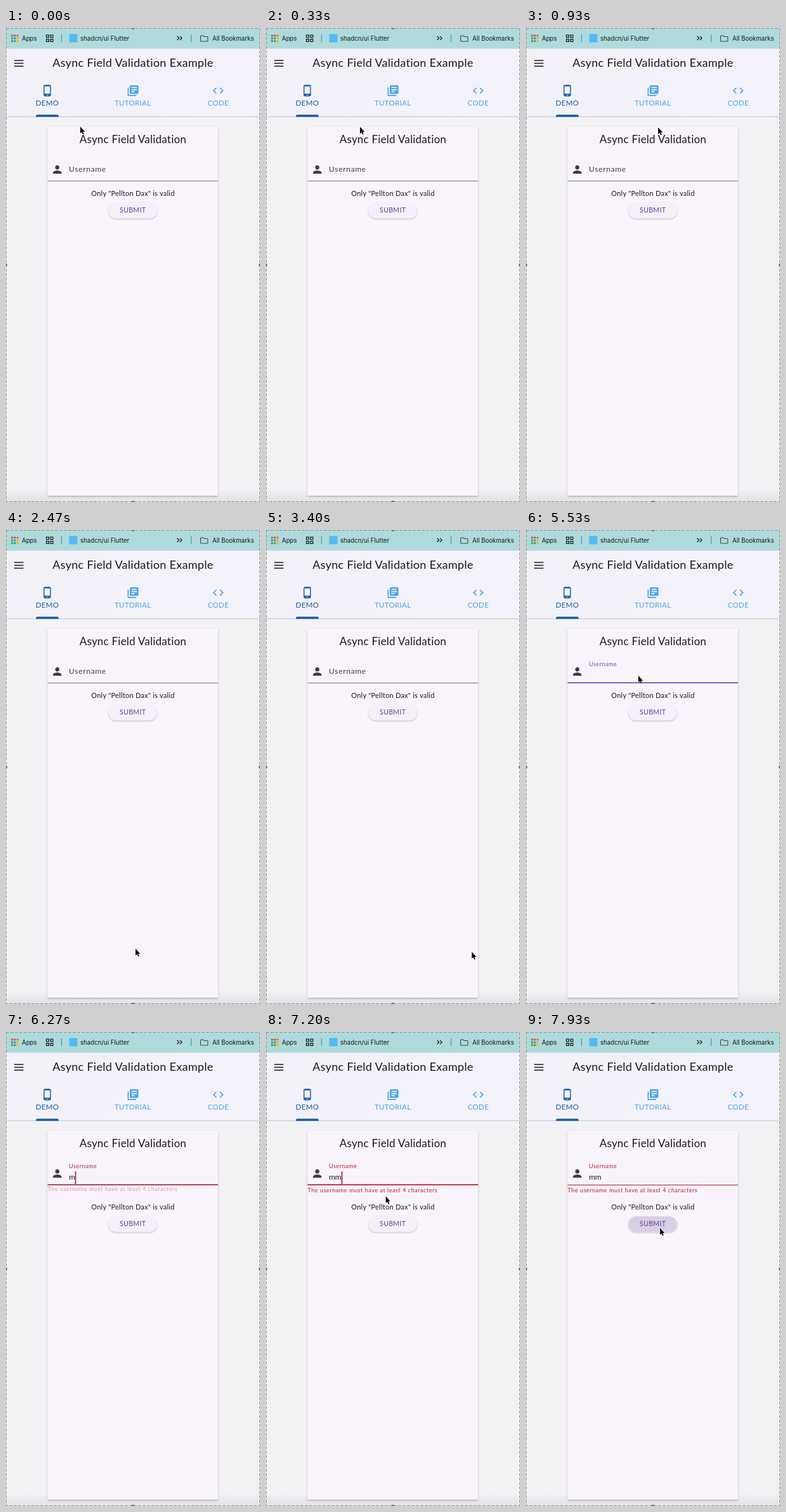
Animation, 400 px wide and 745 px high, one loop 8000 ms. Source, as an HTML page:

```html
<!DOCTYPE html>
<html lang="en">
<head>
<meta charset="utf-8">
<title>Async field validation</title>
<style>
  html, body { margin: 0; width: 100%; height: 100%; overflow: hidden; background: #f2f1f4; }
  svg { display: block; width: 400px; height: 745px; }
  text { font-family: Lato, sans-serif; fill: #1b1a1f; }
  .chrome text { font: 9.7px Inter, sans-serif; fill: #10191b; }
  .mid { text-anchor: middle; }
  .tab { font-size: 11.5px; letter-spacing: .3px; }
  .on, .on text { fill: #195ca3; }
  .off, .off text { fill: #4ba4e8; }
</style>
</head>
<body>
<svg viewBox="0 0 400 745">
  <defs>
    <linearGradient id="bar" x2="1">
      <stop stop-color="#f2f1f8"/><stop offset="1" stop-color="#f4f2fa"/>
    </linearGradient>
    <linearGradient id="foot" x2="0" y2="1">
      <stop stop-color="#f2f1f4"/><stop offset="1" stop-color="#e2e1e5"/>
    </linearGradient>
    <filter id="cardShadow" x="-10%" y="-5%" width="120%" height="110%">
      <feDropShadow dx="0" dy="1.5" stdDeviation="1.5" flood-opacity=".25"/>
    </filter>
    <filter id="buttonShadow" x="-10%" y="-30%" width="120%" height="170%">
      <feDropShadow dx="0" dy="1" stdDeviation=".9" flood-opacity=".3"/>
    </filter>
  </defs>

  <rect width="400" height="745" fill="#f2f1f4"/>
  <rect y="725" width="400" height="20" fill="url(#foot)"/>

  <rect y="32" width="400" height="107" fill="url(#bar)"/>
  <g class="chrome">
    <rect width="400" height="32.5" fill="#afdadb"/>
    <g id="apps"></g>
    <text x="25" y="19.6">Apps</text>
    <path d="M63.6 11.1h3.8v3.8h-3.8zM70.1 11.1h3.8v3.8h-3.8zM63.6 17.6h3.8v3.8h-3.8zM70.1 17.6h3.8v3.8h-3.8z" fill="none" stroke="#1a2426" stroke-width="1.3"/>
    <path d="M87.5 10V22M291.5 10V22" stroke="#459db8" stroke-width="1.3"/>
    <rect x="99.5" y="9.5" width="13" height="13" fill="#54b9f2"/>
    <text x="117" y="19.6">shadcn/ui Flutter</text>
    <path d="M269.5 13l3 3-3 3M274 13l3 3-3 3" fill="none" stroke="#1a2426" stroke-width="1.3"/>
    <path d="M306.5 20V13q0-1 1-1h3l1.3 1.5h5q1 0 1 1V20q0 1-1 1h-9.3q-1 0-1-1z" fill="none" stroke="#3b494b" stroke-width="1.1"/>
    <text x="325" y="19.6">All Bookmarks</text>
  </g>

  <path d="M0 139.4H400" stroke="#c6c4ca"/>
  <path d="M13 51H27.5M13 55.5H27.5M13 60H27.5" stroke="#1b1a1f" stroke-width="1.7"/>
  <text class="mid" x="199.9" y="60.5" font-size="18" letter-spacing=".29">Async Field Validation Example</text>

  <g class="tab mid on">
    <path transform="translate(55 88.4) scale(.83)" d="M16 1H8C6.34 1 5 2.34 5 4v16c0 1.66 1.34 3 3 3h8c1.66 0 3-1.34 3-3V4c0-1.66-1.34-3-3-3zm-2 20h-4v-1h4v1zm3.25-3H6.75V4h10.5v14z"/>
    <text x="65" y="121.8">DEMO</text>
    <path d="M47 139.8v-1q0-2.5 2.5-2.5h31q2.5 0 2.5 2.5v1z"/>
  </g>
  <g class="tab mid off">
    <path transform="translate(189.8 88.3) scale(.85)" d="M4 6H2v14c0 1.1.9 2 2 2h14v-2H4V6zm16-4H8c-1.1 0-2 .9-2 2v12c0 1.1.9 2 2 2h12c1.1 0 2-.9 2-2V4c0-1.1-.9-2-2-2zm-1 9H9V9h10v2zm-4 4H9v-2h6v2zm4-8H9V5h10v2z"/>
    <text x="199.7" y="121.8">TUTORIAL</text>
    <path transform="translate(324 88.3) scale(.85)" d="M9.4 16.6L4.8 12l4.6-4.6L8 6l-6 6 6 6 1.4-1.4zm5.2 0l4.6-4.6-4.6-4.6L16 6l6 6-6 6-1.4-1.4z"/>
    <text x="334.2" y="121.8">CODE</text>
  </g>

  <rect x="65.5" y="155" width="268.5" height="580" rx="1.5" fill="#f9f3fc" filter="url(#cardShadow)"/>
  <text class="mid" x="199.9" y="181.2" font-size="17" letter-spacing=".23">Async Field Validation</text>

  <path transform="translate(70.8 212.5) scale(.83)" fill="#403b44" d="M12 12c2.21 0 4-1.79 4-4s-1.79-4-4-4-4 1.79-4 4 1.79 4 4 4zm0 2c-2.67 0-8 1.34-8 4v2h16v-2c0-2.66-5.33-4-8-4z"/>
  <text id="label" font-size="12" letter-spacing=".7">Username</text>
  <text id="value" x="99" y="232.2" font-size="12"></text>
  <rect id="caret" y="219" width="1.7" height="20"/>
  <rect id="line" x="65.5" width="268.5"/>
  <text id="error" x="65.5" font-size="9" letter-spacing=".56">The username must have at least 4 characters</text>

  <g id="below">
    <text class="mid" x="199.9" y="264.4" font-size="11" letter-spacing=".25">Only "Pellton Dax" is valid</text>
    <rect x="161.3" y="274.8" width="76.6" height="24.5" rx="12.25" fill="#f5eff9" filter="url(#buttonShadow)"/>
    <rect id="ink" x="161.3" y="274.8" width="76.6" height="24.5" rx="12.25" fill="#d8cee6"/>
    <text class="mid" x="199.7" y="290.3" font-size="10.5" letter-spacing=".35" style="fill:#5c4598">SUBMIT</text>
  </g>

  <rect x=".5" y=".5" width="399" height="744" fill="none" stroke="#85888b" stroke-dasharray="4 3"/>
  <path d="M198 0h4v2h-4zM198 743h4v2h-4zM0 370.5h2v4H0zM398 370.5h2v4h-2z" fill="#77797c"/>
  <path id="cursor" d="M0 0V10.8L2.4 8.6 4 12.2 5.7 11.5 4.1 7.9H7.3Z" fill="#050505" stroke="#fff" stroke-width=".8" paint-order="stroke"/>
</svg>
<script>
const LOOP = 8000, STEP = 1000 / 15;
const PURPLE = [103, 80, 164], RED = [179, 33, 47];
const $ = id => document.getElementById(id);
const set = (id, attrs) => { for (const k in attrs) $(id).setAttribute(k, attrs[k]); };
const show = (id, on) => set(id, { visibility: on ? 'visible' : 'hidden' });
const ramp = (t, from, to) => Math.min(1, Math.max(0, (t - from) / (to - from)));
const mix = (a, b, k) => a + (b - a) * k;

// time, x, y of the pointer's tip
const path = [
  [0, 117, 155], [70, 119, 155], [870, 207, 156], [933, 208, 156], [1467, 214, 397],
  [1667, 214, 397], [1800, 206, 416], [1933, 206, 416], [2200, 204, 658], [2467, 204, 658],
  [2667, 198, 680], [3000, 254, 699], [3200, 254, 699], [3400, 324, 663], [3533, 324, 663],
  [3600, 338, 664], [3933, 330, 535], [4000, 330, 535], [4067, 313, 508], [4267, 313, 508],
  [4733, 182, 230], [4867, 177, 229], [7067, 177, 229], [7467, 212, 317], [7667, 211, 308], [8000, 211, 308]
];

function pointerAt(t) {
  const i = Math.max(1, path.findIndex(p => p[0] >= t));
  const [a, b] = [path[i - 1], path[i]], k = ramp(t, a[0], b[0]);
  return [mix(a[1], b[1], k), mix(a[2], b[2], k)];
}

const dots = ['#e8453c', '#e8453c', '#ee6a3a', '#34a853', '#4285f4', '#f4b400', '#34a853', '#34a853', '#f4b400'];
$('apps').innerHTML = dots.map((c, i) =>
  `<rect x="${8 + i % 3 * 4.3}" y="${10.5 + (i / 3 | 0) * 4.3}" width="3.1" height="3.1" rx=".8" fill="${c}"/>`).join('');

function draw(t) {
  const typed = t < 6060 ? '' : t < 6925 ? 'm' : 'mm';
  const focused = t >= 5060 && t < 7590, invalid = t >= 6190, hovered = t >= 4590;
  const accent = `rgb(${PURPLE.map((c, i) => mix(c, RED[i], ramp(t, 6000, 6333)))})`;

  const float = 1 - (1 - ramp(t, 5000, 5200)) ** 2;
  set('label', {
    transform: `translate(99 ${mix(226.3, 214.3, float)}) scale(${mix(1, .75, float)})`,
    style: `fill:${focused || invalid ? accent : '#403b44'}`
  });
  $('value').textContent = typed;
  show('caret', focused && (t >= 5190 && t < 5525 || typed));
  set('caret', { x: 98.7 + typed.length * 10, fill: accent });

  const weight = focused ? 1.7 : 1;
  set('line', {
    y: 241 - weight, height: weight,
    fill: focused || invalid ? accent : hovered ? '#1d1b20' : '#7b7680'
  });

  const reveal = ramp(t, 6190, 6367);
  set('error', { y: mix(249, 252.3, reveal), opacity: reveal, style: 'fill:#b3212f' });
  set('below', { transform: `translate(0 ${invalid ? 15 : 0})` });
  set('ink', { opacity: .3 * ramp(t, 7400, 7600) + .7 * ramp(t, 7733, 7933) });

  show('cursor', !(t >= 3660 && t < 3995 || t >= 6060 && t < 7125));
  set('cursor', { transform: `translate(${pointerAt(t)})` });
}

function tick() {
  draw(Math.floor((performance.now() % LOOP + 4) / STEP) * STEP % LOOP);
  requestAnimationFrame(tick);
}
tick();
</script>
</body>
</html>
```
